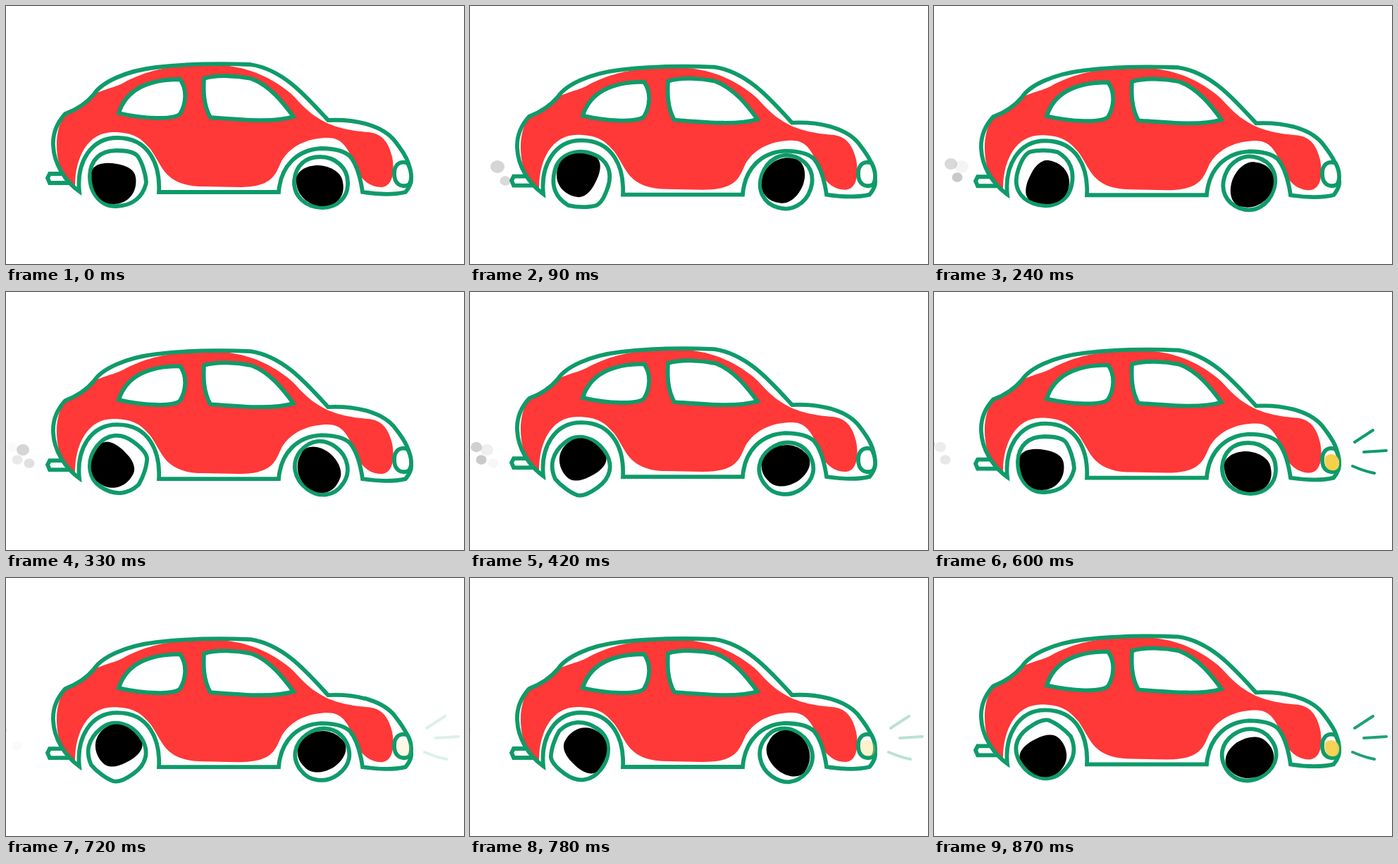
Write an HTML page that moves like this. It is 650 px wide and 366 px high and loops after 0.9 s.

```html
<!DOCTYPE html>
<html lang="en">
<head>
<meta charset="utf-8">
<title>Bouncing car</title>
<style>
  html, body { margin: 0; width: 100%; height: 100%; overflow: hidden; background: #fff; }
  svg { display: block; width: 100vw; height: 100vh; }
  .line { fill: none; stroke: #0f9b69; stroke-width: 5.8; }
  .white { fill: #fff; }
</style>
</head>
<body>
<svg viewBox="0 0 650 366">
  <g id="smoke" fill="#999"></g>

  <g id="body">
    <path class="line" d="M86 238H62L59 244 62 251H96"/>
    <path fill="#ff3838" d="M84 153C73 170 70 190 73 212C76 235 88 249 98 255
      C98 215 116 179 152 179C182 179 192 188 205 203
      C213 214 218 226 226 236C238 250 255 256 280 256L330 257
      C378 257 382 240 391 220C405 196 432 187 457 187C474 187 483 198 490 214
      C498 238 510 257 533 257C549 256 552 235 548 214C543 193 533 180 513 179
      C480 176 460 170 443 159C420 145 412 128 395 117C365 95 335 86 305 84
      C250 84 210 85 165 110C150 117 132 120 122 127C108 142 96 146 84 153Z"/>
    <path class="line" d="M104 263C83 248 68 223 67 198C66 180 74 164 84 153
      C100 147 114 138 125 125C136 108 170 92 213 87C255 82 300 81 347 83
      C393 90 425 127 457 162C500 160 537 171 553 193C566 210 574 222 575 244
      C576 252 572 258 567 264C550 268 526 267 506 264C503 243 498 225 488 213
      C478 204 462 202 447 202C414 204 390 226 387 264H217
      C219 225 203 187 158 187C120 187 100 222 104 263Z"/>
    <path class="line white" d="M160 152C170 120 198 104 247 104
      C258 119 255 140 247 153C238 162 195 160 160 152Z"/>
    <path class="line white" d="M281 103C299 97 328 99 348 103
      C375 113 394 138 408 157C378 166 330 161 290 158C280 140 280 120 281 103Z"/>
  </g>

  <g id="rear">
    <path class="line white" d="M119 240C120 218 134 205 157 205C172 205 182 207 187 213
      C193 222 198 237 199 250C195 270 181 283 157 284C135 285 118 265 119 240Z"/>
    <path d="M122 234C125 223 142 221 157 224C172 226 183 233 184 243
      C187 262 175 281 153 281C130 281 119 258 122 234Z"/>
  </g>
  <g id="front">
    <path class="line white" d="M409 248C411 226 425 214 446 214C468 214 485 230 485 250
      C486 272 470 286 449 286C425 286 408 270 409 248Z"/>
    <path d="M412 250C410 236 424 226 443 226C462 227 477 237 478 250
      C482 270 470 284 448 284C428 283 413 268 412 250Z"/>
  </g>

  <path class="line white" d="M551 238C551 224 560 219 570 223C576 234 577 248 571 254
    C560 258 551 252 551 238Z"/>
  <g id="light">
    <path fill="#f6d04a" d="M555 234C561 227 573 229 575 240C576 249 572 254 564 253
      C556 252 554 243 555 234Z"/>
    <path class="line" style="stroke-width:4;stroke-linecap:round"
      d="M597 213L623 196M610 227L642 225M594 247Q610 254 625 257"/>
  </g>
</svg>
<script>
const LOOP = 900, STEP = 30, SPIN = 360 / 300;
const $ = id => document.getElementById(id);
const set = (el, attrs) => Object.entries(attrs).forEach(([k, v]) => el.setAttribute(k, v));

const puffs = [];
function addPuff(cx, cy, rx, peak, fadeOut) {
  const el = document.createElementNS("http://www.w3.org/2000/svg", "ellipse");
  set(el, { cx, cy, rx, ry: rx * 0.9 });
  $("smoke").append(el);
  puffs.push({ el, peak, fadeOut });
}
// Two rows of puffs drift to the left, each one lingering longer than the last
for (let i = 0; i < 4; i++) addPuff(39 - 15 * i, 228 - 4 * i, 10 - i, 120 + 160 * i, 150 + 45 * i);
for (let i = 0; i < 3; i++) addPuff(50 - 17 * i, 248 - 5 * i, 7.5, 60 + 170 * i, 90 + 130 * i);

// Heights of the suspension at its turning points
const bounce = [[0, 0], [150, 5.6], [500, -3], [750, 4.4], [LOOP, 0]];

function bodyShift(t) {
  const i = bounce.findIndex(([time]) => time > t);
  const [t0, a] = bounce[i - 1], [t1, b] = bounce[i];
  return a + (b - a) * (1 - Math.cos(Math.PI * (t - t0) / (t1 - t0))) / 2;
}

function flash(t) {
  const start = 460, half = 140;
  return t < start ? 0 : 1 - Math.abs((t - start) % (2 * half) / half - 1);
}

function puffLevel(t, { peak, fadeOut }) {
  const fade = t < peak ? (peak - t) / 120 : (t - peak) / fadeOut;
  return t && Math.max(0, 1 - fade);
}

function draw(now) {
  const t = Math.floor(now % LOOP / STEP) * STEP;
  set($("body"), { transform: `translate(0 ${bodyShift(t)})` });
  set($("rear"), { transform: `rotate(${t * SPIN} 157.5 245)` });
  set($("front"), { transform: `rotate(${t * SPIN} 448 250.5)` });
  set($("light"), { opacity: flash(t) });
  puffs.forEach(p => set(p.el, { opacity: puffLevel(t, p) * 0.55 }));
  requestAnimationFrame(draw);
}
draw(performance.now());
</script>
</body>
</html>
```
